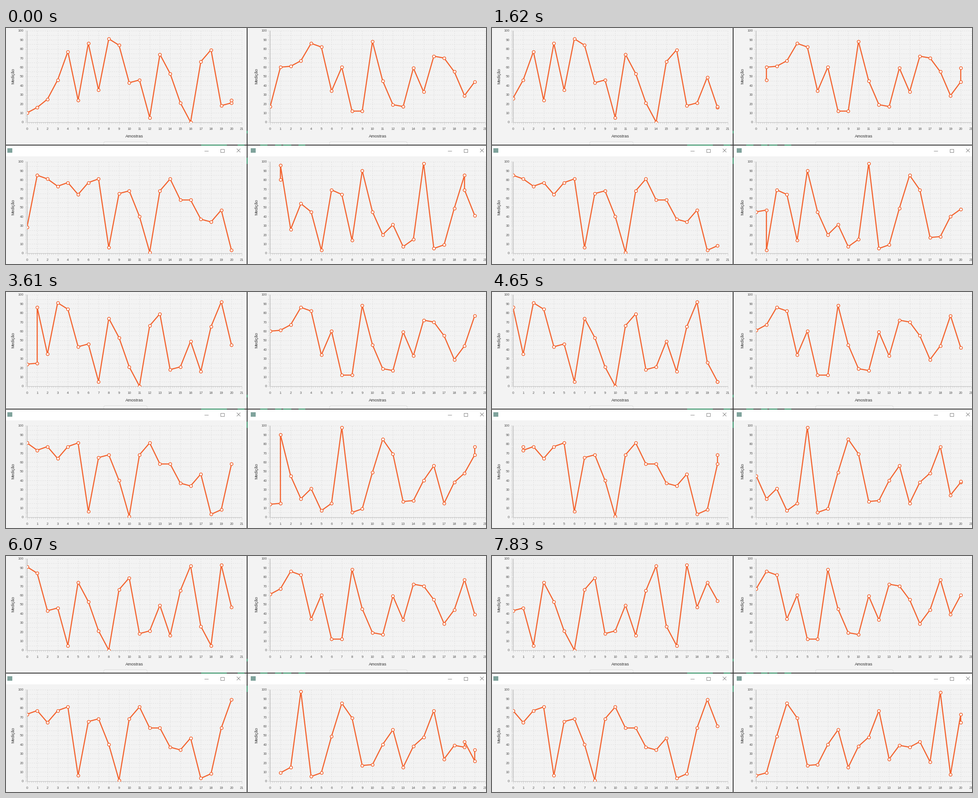
Write a matplotlib script that moves like this. It is 1065 px wide and 526 px high and loops after 8000 ms.

```python
import numpy as np
import matplotlib.pyplot as plt
from matplotlib.animation import FuncAnimation
from matplotlib.collections import LineCollection
from matplotlib.patches import FancyBboxPatch, Rectangle

W, H, DPI = 1065, 526, 100
LOOP, STEP = 8000, 40
PT = 72 / DPI                      # points per pixel
DX, DY = 22.69, 2.04               # pixels per sample and per unit
COLS, ROWS = (46.5, 586.2), (209.7, 501.6)
SPAN = 21
ADD_MS, DROP_MS = 700, 500
ORANGE, GREEN, DARK = "#f3622d", "#2f8f63", "#3c3c3c"

# Moments at which the screen refreshes
SHOTS = np.concatenate([[0, 50], np.linspace(350, 1370, 6),
                        np.linspace(1620, 2640, 6), [2870, 3080],
                        np.linspace(3360, 4310, 5), np.linspace(4480, 5510, 7),
                        np.linspace(5700, 6410, 5), np.linspace(6690, 7600, 5),
                        [7830]])


def ease(t):
    """Ease in and out over the first and last fifth."""
    t = min(max(t, 0), 1)
    if t < 0.2:
        return 3.125 * t * t
    if t > 0.8:
        return 1 - 3.125 * (1 - t) ** 2
    return 1.25 * t - 0.125


class Track:
    """Integer value moved by tweens; the latest one started wins."""

    def __init__(self, value):
        self.tweens = [(-1e9, 1, value, value)]

    def at(self, t):
        start, span, a, b = next(w for w in reversed(self.tweens) if w[0] <= t)
        return a + int(np.floor((b - a) * ease((t - start) / span) + 0.5))

    def move(self, t, span, target, origin=None):
        origin = self.at(t) if origin is None else origin
        self.tweens.append((t, span, origin, target))


class Sample:
    def __init__(self, x, y, born=-1e9):
        self.x, self.y = Track(x), Track(y)
        self.goal, self.value = x, y
        self.born, self.gone = born, 1e9


class Feed:
    """Sliding window: each tick drops the oldest sample and adds a new one."""

    def __init__(self, values, ticks):
        self.samples = [Sample(i, v) for i, v in enumerate(values[:SPAN])]
        for k, (t, value) in enumerate(zip(ticks, values[SPAN:])):
            old, rest = self.samples[k], self.samples[k + 1:]
            old.gone = t + DROP_MS
            old.x.move(t, DROP_MS, rest[0].goal)
            old.y.move(t, DROP_MS, rest[0].value)
            for s in rest:
                s.goal -= 1
                s.x.move(t, ADD_MS, s.goal)
            new = Sample(SPAN - 1, value, t)
            new.y.move(t, ADD_MS, value, rest[-1].value)
            self.samples.append(new)

    def points(self, t):
        live = [(s.x.at(t), s.y.at(t)) for s in self.samples
                if s.born <= t < s.gone]
        return np.array(sorted(live, key=lambda p: p[0]))


FEEDS = [
    Feed([9, 16, 25, 46, 77, 24, 86, 35, 91, 84, 43, 46, 5, 74, 53, 21, 0, 66,
          79, 18, 21, 49, 16, 65, 92, 26, 5, 93, 47, 74, 54],
         [-130, 720, 1560, 2302, 3125, 3890, 4640, 5370, 6180, 7030]),
    Feed([17, 60, 61, 67, 86, 82, 34, 60, 12, 12, 88, 45, 19, 17, 59, 33, 72,
          70, 55, 29, 44, 77, 39, 60],
         [1300, 4062, 6824]),
    Feed([28, 85, 81, 73, 77, 64, 77, 81, 6, 65, 68, 40, 1, 68, 81, 58, 58, 37,
          34, 47, 3, 8, 58, 89, 60],
         [348, 2374, 4400, 6426]),
    Feed([50, 16, 96, 26, 54, 45, 3, 69, 64, 14, 90, 45, 20, 31, 7, 15, 98, 5,
          9, 49, 85, 69, 17, 18, 40, 56, 15, 38, 48, 77, 24, 39, 37, 43, 21,
          97, 7, 73, 10],
         [-716, -371, 170, 715, 1260, 1733, 2206, 2680, 3143, 3595, 4060, 4640,
          5100, 5420, 5890, 6480, 7080, 7680]),
]

plt.rcParams["font.family"] = "Liberation Sans"
fig = plt.figure(figsize=(W / DPI, H / DPI), dpi=DPI, facecolor="#f3f3f3")
ax = fig.add_axes([0, 0, 1, 1])
ax.set_xlim(0, W)
ax.set_ylim(H, 0)
ax.axis("off")


def strokes(segments, color, width=1.0, **kw):
    ax.add_collection(LineCollection(segments, colors=color,
                                     linewidths=width * PT, **kw))


def label(x, y, text, size, color="#333333", **kw):
    kw = {"ha": "center", "va": "center_baseline", **kw}
    ax.text(x, y, text, fontsize=size * PT, color=color, **kw)


def rect(x, y, w, h, color, **kw):
    ax.add_patch(Rectangle((x, y), w, h, facecolor=color, lw=0, **kw))


def draw_chart(x0, y0):
    """Grid, axes and labels; returns the line to animate."""
    right, top = x0 + SPAN * DX, y0 - 100 * DY
    grid = [[(x0 + i * DX, top), (x0 + i * DX, y0)] for i in range(1, SPAN + 1)]
    grid += [[(x0, y0 - v * DY), (right, y0 - v * DY)]
             for v in range(5, 101, 5)]
    strokes(grid, "#dadada", 0.8, linestyles=(0, (3, 3)), zorder=1)

    ticks = [[(x0 + i * DX / 5, y0), (x0 + i * DX / 5, y0 + (3.5 if i % 5 else 5))]
             for i in range(SPAN * 5 + 1)]
    strokes(ticks, "#c6c6c6", 0.8, zorder=2)
    comb = [[(x0 - (5 if v % 5 == 0 else 3.5), y0 - v * DY), (x0, y0 - v * DY)]
            for v in range(101)]
    strokes(comb, "#c6c6c6", 0.8, zorder=2)
    strokes([[(x0, top), (x0, y0)], [(x0, y0), (right, y0)]], "#bdbdbd", zorder=2)

    for v in range(0, 101, 10):
        label(x0 - 7.3, y0 - v * DY + 0.3, str(v), 7.7, "#555555", ha="right")
    for i in range(SPAN + 1):
        label(x0 + i * DX, y0 + 14.7, str(i), 7.7, "#555555", clip_on=True)
    label(x0 - 30.5, y0 - 50 * DY, "Medição", 9.4, rotation=90, va="center")
    if y0 < H / 2:
        label(x0 + SPAN * DX / 2, y0 + 30.5, "Amostras", 9.4)

    line, = ax.plot([], [], color=ORANGE, lw=2.4 * PT, marker="o",
                    ms=6.4 * PT, mfc="white", mec=ORANGE, mew=1.5 * PT,
                    solid_joinstyle="round", zorder=4)
    line.set_clip_path(Rectangle((x0, top - 1), SPAN * DX, 100 * DY + 1.3,
                                 transform=ax.transData))
    return line


def draw_title_bar(x):
    rect(x, 262, 534, 24, "white", zorder=5)
    rect(x + 2.5, 267.5, 11.5, 10, "#7fa39c", zorder=6)
    box = [(475.5, 269.5), (483.5, 269.5), (483.5, 276.5), (475.5, 276.5),
           (475.5, 269.5)]
    shapes = [[(440, 273.5), (449, 273.5)], box,
              [(512, 269), (520, 277)], [(512, 277), (520, 269)]]
    strokes([[(x + a, b) for a, b in s] for s in shapes], "#7a7a7a", 0.9, zorder=6)


lines = [draw_chart(x, y) for y in ROWS for x in COLS]

for x, w in ((217, 96), (718, 172)):
    ax.add_patch(FancyBboxPatch((x + 3, 256.5), w - 6, 12,
                                boxstyle="round,pad=3,rounding_size=3",
                                fc="#f6f6f6", ec="#d4d4d4", lw=0.8 * PT, zorder=3))
draw_title_bar(0)
draw_title_bar(540)
rect(536, 262, 4, 24, "white", zorder=5)

# Gaps between the windows
rect(0, 260.3, W, 1.7, DARK, zorder=7)
rect(534.3, 0, 1.7, H, DARK, zorder=7)
for a, b in ((433, 490), (514, 529), (564, 580), (597, 611), (615, 633), (649, 664)):
    rect(a, 260.3, b - a, 1.7, GREEN, zorder=8)
for a, b in ((229, 235), (289, 303)):
    rect(534.3, a, 1.7, b - a, GREEN, zorder=8)


def update(i):
    t = SHOTS[SHOTS < (i + 1) * STEP][-1]
    for k, (line, feed) in enumerate(zip(lines, FEEDS)):
        x, y = feed.points(t).T
        line.set_data(COLS[k % 2] + x * DX, ROWS[k // 2] - y * DY)
    return lines


anim = FuncAnimation(fig, update, frames=LOOP // STEP, interval=STEP,
                     repeat=True, repeat_delay=0, blit=False)
plt.show()
```
